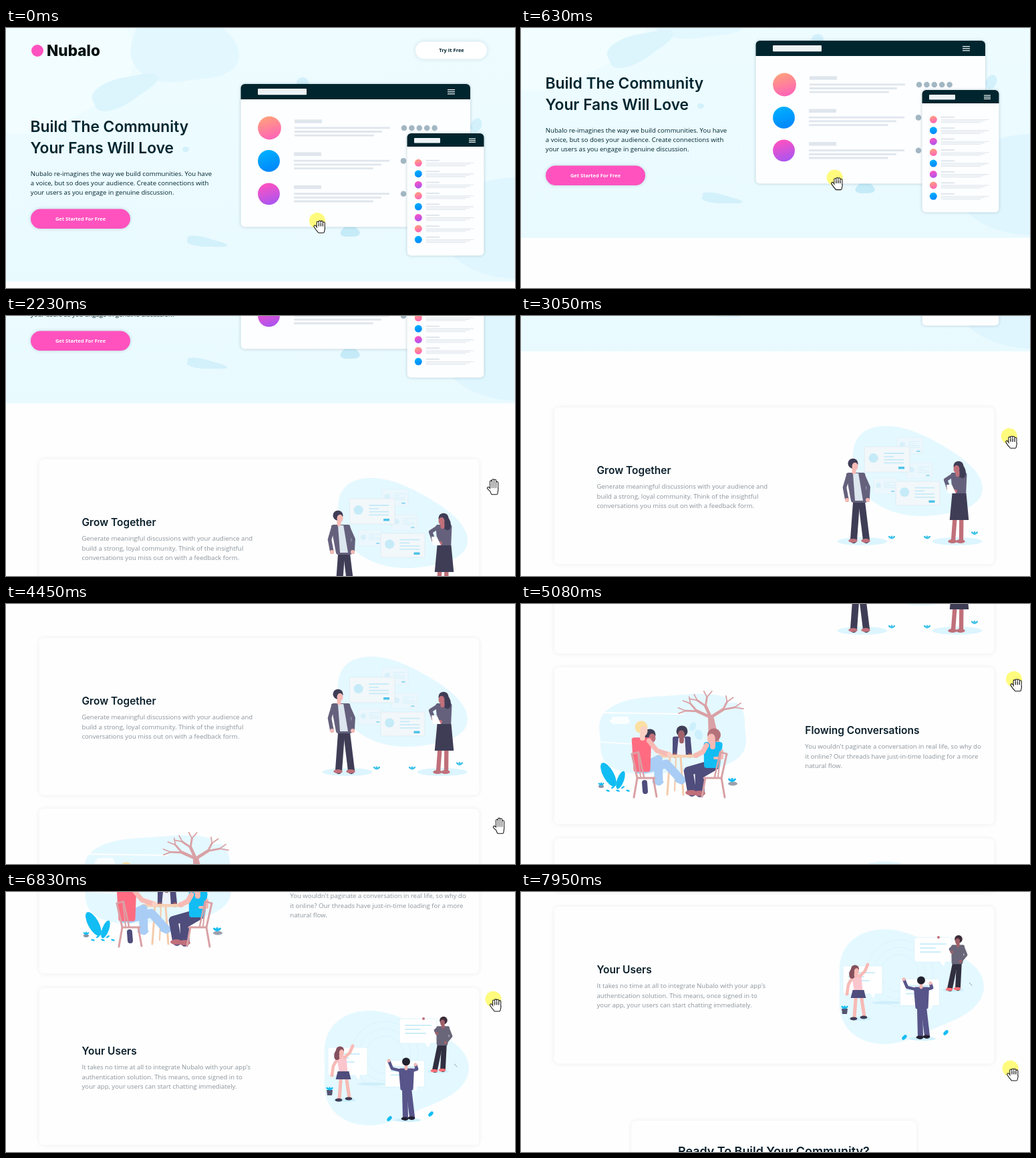
These frames come from a looping animation (762x390 px, 8000 ms). An HTML page with a canvas:

```html
<!DOCTYPE html>
<html lang="en">
<head>
<meta charset="utf-8">
<title>Community landing page</title>
<style>
html, body { margin: 0; width: 100%; height: 100%; overflow: hidden; background: #fefefe; }
canvas { display: block; width: 762px; height: 390px; }
</style>
</head>
<body>
<canvas id="stage"></canvas>
<script>
const W = 762, H = 390, PAGE = 1540, LOOP = 8000, TAU = Math.PI * 2;
const dpr = window.devicePixelRatio || 1;
const HEAD = 'Inter, sans-serif', BODY = '"Open Sans", sans-serif';
const INK = '#00252e', SKY = '#e4f8ff', SHADE = '#d3f1fb', BAR = '#dfe6ed', PALE = '#c6ebf8';
const NAVY = '#3f3d56', INDIGO = '#4f4d7c', SLATE = '#65617d', BLUE = '#12bdf3';
const ROSE = '#d9a1a5', BRICK = '#c0707a', PEACH = '#f7bab5', WOOD = '#f4cbac';

const stage = document.getElementById('stage');
const page = document.createElement('canvas');
let g;

function setup(canvas, h) {
  canvas.width = W * dpr;
  canvas.height = h * dpr;
  const c = canvas.getContext('2d');
  c.scale(dpr, dpr);
  return c;
}

// Basic shapes
function box(x, y, w, h, r, fill, edge) {
  g.beginPath();
  g.roundRect(x, y, w, h, r);
  g.fillStyle = fill;
  g.fill();
  if (edge) { g.strokeStyle = edge; g.lineWidth = 0.8; g.stroke(); }
}
function shadowed(blur, color, draw) {
  g.save();
  g.shadowBlur = blur * dpr;
  g.shadowColor = color;
  draw();
  g.restore();
}
function oval(x, y, rx, ry, fill, turn = 0) {
  g.beginPath();
  g.ellipse(x, y, rx, ry, turn, 0, TAU);
  g.fillStyle = fill;
  g.fill();
}
const dot = (x, y, r, fill) => oval(x, y, r, r, fill);
function line(color, w, ...p) {
  g.beginPath();
  for (let i = 0; i < p.length; i += 2) g.lineTo(p[i], p[i + 1]);
  g.strokeStyle = color;
  g.lineWidth = w;
  g.lineCap = g.lineJoin = 'round';
  g.stroke();
}
// Ellipse whose radius swells `lobes` times around
function blob(fill, x, y, rx, ry, turn, lobes, swell, phase = 0) {
  g.save();
  g.translate(x, y);
  g.rotate(turn);
  g.beginPath();
  for (let a = 0; a < TAU; a += 0.05) {
    const r = 1 + swell * Math.cos(lobes * (a - phase));
    g.lineTo(rx * r * Math.cos(a), ry * r * Math.sin(a));
  }
  g.fillStyle = fill;
  g.fill();
  g.restore();
}
// Four-sided shape between two level edges
function taper(fill, x1, y1, half1, x2, y2, half2, round = 0) {
  g.beginPath();
  g.moveTo(x1 - half1, y1);
  g.lineTo(x1 + half1, y1);
  g.lineTo(x2 + half2, y2);
  g.lineTo(x2 - half2, y2);
  g.closePath();
  g.fillStyle = g.strokeStyle = fill;
  g.fill();
  if (round) { g.lineWidth = round; g.lineJoin = 'round'; g.stroke(); }
}
function text(str, x, y, font, color, align = 'left') {
  g.font = font;
  g.fillStyle = color;
  g.textAlign = align;
  g.fillText(str, x, y);
}
function para(lines, x, y, color) {
  lines.forEach((s, i) => text(s, x, y + i * 14.4, '9.6px ' + BODY, color));
}
function fade(x0, y0, x1, y1, a, b) {
  const f = g.createLinearGradient(x0, y0, x1, y1);
  f.addColorStop(0, a);
  f.addColorStop(1, b);
  return f;
}

// Top of the page
function hero() {
  g.save();
  g.beginPath();
  g.rect(0, 0, W, 380);
  g.clip();
  box(0, 0, W, 380, 0, fade(0, 0, 0, 380, '#eefcff', '#e9faff'));
  blob('#f2fdff', 50, 40, 130, 115, 0, 3, 0.1);
  blob('#e3f7fe', 262, 22, 80, 62, 0.3, 3, 0.12);
  blob('#dcf5fd', 174, 95, 52, 20, -0.4, 3, 0.12);
  oval(269, 182, 5, 4, SHADE);
  blob(SHADE, 297, 321, 30, 7, 0.15, 3, 0.15);
  blob(PALE, 515, 305, 14, 9, 0, 3, 0.12, 0.5);
  oval(444, 82, 9, 8, SHADE);
  oval(704, 146, 8, 11, SHADE, 0.4);
  oval(765, 300, 115, 76, '#e0f6fe');
  g.restore();

  dot(47, 34, 9, '#ff52bf');
  text('Nubalo', 61, 41.5, '800 22.6px ' + HEAD, '#00100f');
  shadowed(6, 'rgba(0,50,70,.14)', () => box(613, 20.5, 107, 26, 13, '#fff'));
  text('Try It Free', 667, 35.5, 'bold 7.5px ' + BODY, INK, 'center');

  ['Build The Community', 'Your Fans Will Love'].forEach((s, i) =>
    text(s, 36.5, 156 + i * 32, '600 22.8px ' + HEAD, INK));
  para(['Nubalo re-imagines the way we build communities. You have',
    'a voice, but so does your audience. Create connections with',
    'your users as you engage in genuine discussion.'], 36.8, 221.5, INK);
  shadowed(5, 'rgba(0,50,70,.2)', () => box(37, 271.5, 149, 29.5, 14.75, '#ff52bf'));
  text('Get Started For Free', 111.5, 288.7, 'bold 7.5px ' + BODY, '#fff', 'center');
}
function avatar(x, y, r, i) {
  const [a, b] = [['#ffa07c', '#ff62ba'], ['#00b0ff', '#0086fb'], ['#ff52bf', '#a855f2']][i % 3];
  dot(x, y, r, fade(x - r * 0.3, y - r, x + r * 0.3, y + r, a, b));
}
function menu(x, y, w, gap) {
  for (let i = -1; i < 2; i++) box(x, y + i * gap - 0.6, w, 1.3, 0, '#e8f0f2');
}
function bars(x, y, w, h, gap) {
  for (let i = 0; i < 3; i++) box(x, y + i * gap, w * (1 - i * 0.085), h, 0.4, BAR);
}
function panel(x, y, w, h, top) {
  shadowed(4, 'rgba(0,60,80,.25)', () => box(x, y, w, h, 6, '#fdfeff'));
  box(x, y, w, top, [6, 6, 0, 0], INK);
}
function mockups() {
  panel(351.5, 84, 343.5, 214.5, 23);
  box(377, 91, 73, 9.2, 1, '#edf3f5');
  menu(661, 95.7, 11, 3.1);
  for (let i = 0; i < 3; i++) {
    const y = 150 + i * 49.4, x = i ? 431 : 432;
    avatar(i ? 393.5 : 394.5, y, i ? 16.4 : 17.4, i);
    box(x, y - 12.8, 41, 5.5, 0.5, BAR);
    bars(x, y - 1.6, 143, 2.8, 5.7);
    for (let k = 0; k < 5; k++) dot(x + 164 + k * 11.4, y, 4.3, '#a2b7c3');
  }
  panel(600.5, 158, 115, 183.5, 20);
  box(611, 165, 39, 7.5, 1, '#edf3f5');
  menu(693, 168.7, 10, 2.6);
  for (let i = 0; i < 8; i++) {
    const y = 202.3 + i * 16.43;
    avatar(617.3, y, 5.5, i);
    box(628.5, y - 4.6, 20.5, 2, 0, BAR);
    bars(628.5, y - 0.4, 72, 1.1, 2.1);
  }
}

function card(y, x, title, lines) {
  shadowed(6, 'rgba(30,60,80,.09)', () => box(49.5, y, 659, 235.5, 7, '#fefefe'));
  text(title, x, y + 99.5, '600 15.5px ' + HEAD, '#0a1f2b');
  para(lines, x, y + 122.3, '#8b949b');
}

// Parts shared by the illustrations
function leaves(x, y, size, color) {
  for (let i = -1; i < 2; i++) oval(x + i * size, y, size / 2, size, color, i * 0.9);
}
function limb(color, w, x1, y1, x2, y2, bend = 0) {
  const mx = (x1 + x2) / 2 - (y2 - y1) * bend, my = (y1 + y2) / 2 + (x2 - x1) * bend;
  line(color, w, x1, y1, mx, my, x2, y2);
}
function head(x, y, r, { skin, hair, face = 1, long }) {
  if (long) oval(x - face * r * 0.5, y + r * 0.7, r * 0.9, r * 1.5, hair, face * 0.3);
  line(skin, r * 0.8, x + face * r * 0.2, y, x + face * r * 0.2, y + r * 1.5);
  dot(x, y - r * 0.25, r, hair);
  if (face) oval(x + face * r * 0.4, y + r * 0.35, r * 0.6, r * 0.8, skin);
}
// Hands and feet are [x, y, bend of the elbow or knee]
function person(p) {
  const [x, y] = p.head, [hx, hy] = p.hip, r = p.r, wide = p.wide || 1.3;
  const sx = x + (hx - x) * 0.45, sy = y + (hy - y) * 0.28;
  (p.feet || []).forEach(([fx, fy, bend], i) => {
    limb(p.legs, r * (p.skirt ? 0.85 : 1.35), hx + (i - 0.5) * r, hy, fx, fy, bend);
    oval(fx - 1, fy + 1, r * 0.9, r * 0.4, p.shoe);
  });
  taper(p.top, sx, sy, wide * r, hx, hy, wide * r * 0.8, r * 0.8);
  if (p.skirt) taper(p.cloth, hx, hy, r * 1.4, hx, hy + p.skirt, r * 1.9);
  if (p.shirt) taper(p.shirt, sx, sy - 2, r * 0.55, hx, hy, r * 0.8);
  (p.hands || []).forEach(([ax, ay, bend]) => {
    const side = Math.sign(ax - sx) * wide * r;
    limb(p.sleeve || p.top, r * 0.75, sx + side, sy + 1, ax, ay, bend);
    dot(ax, ay, r * 0.4, p.skin);
  });
  head(x, y, r, p);
}

function note(x, y, w, h, s) {
  box(x, y, w, h, 1, '#f2f7fa', '#dbeaf1');
  dot(x + w * 0.2, y + h * 0.45, 7 * s, PALE);
  for (let i = 0; i < 4; i++) box(x + w * 0.43, y + h * 0.24 + i * 4.8 * s, (i === 1 ? 15 : 30) * s, 1.8 * s, 0.8, PALE);
  box(x + w * 0.75, y + h * 0.79, 9 * s, 3.6 * s, 0.5, '#4cc3e8');
}
function growScene() {
  blob(SKY, 587, 150, 101, 61, 0.35, 3, 0.07, -0.23);
  for (const x of [511, 653]) oval(x, 252, 37.5, 6, '#dcf5fe');
  g.globalAlpha = 0.55;
  note(563, 96, 39, 25, 0.6);
  note(577, 134, 39, 23, 0.6);
  note(528, 157, 35, 24, 0.55);
  g.globalAlpha = 1;
  note(514, 110, 68, 38, 1);
  note(561, 162, 66, 36, 1);
  for (const x of [555, 608, 679]) leaves(x, x > 650 ? 239.5 : 246, 2.8, '#3fc3ea');

  person({ head: [497, 137], r: 7.5, hip: [506, 191], wide: 1.5, feet: [[498, 250], [517, 250]],
    hands: [[488, 190, 0.12], [519, 190, -0.12]],
    skin: PEACH, hair: NAVY, top: SLATE, shirt: '#dce6ee', legs: NAVY, shoe: BRICK });
  person({ head: [655, 141], r: 7.5, hip: [656, 180], wide: 1.2, feet: [[647, 251], [659, 251]], skirt: 40,
    hands: [[640, 172, 0.4], [650, 177, -0.5]], face: -1, long: true,
    skin: BRICK, hair: NAVY, top: SLATE, cloth: NAVY, legs: BRICK, shoe: BRICK });
  taper('#fff', 641, 167, 4, 645, 180, 6);
}

// Branches fork until they are thin
function branch(x, y, angle, len, w) {
  const ex = x + Math.cos(angle) * len, ey = y + Math.sin(angle) * len * 0.75;
  line(ROSE, w, x, y, ex, ey);
  if (w < 2) return;
  branch(ex, ey, angle - 0.5, len * 0.7, w * 0.62);
  branch(ex, ey, angle + 0.45, len * 0.75, w * 0.62);
}
function chair(x, y, d) {
  line(ROSE, 3, x, y, x + 8 * d, y + 36, x + 34 * d, y + 36);
  line(ROSE, 2.5, x, y, x + 10 * d, y - 3, x + 18 * d, y + 34);
  line(ROSE, 2, x + 9 * d, y - 2, x + 13 * d, y + 34);
  line(ROSE, 3, x + 8 * d, y + 36, x + 3 * d, y + 65);
  line(ROSE, 3, x + 32 * d, y + 36, x + 37 * d, y + 64);
}
function talkScene() {
  blob(SKY, 227, 151, 117, 62, -0.07, 4, 0.07, TAU / 8);
  line('#fff', 2.2, 118, 119, 242, 121);
  line('#fff', 1.6, 118, 163, 166, 166);
  box(136, 125, 25, 11, 2, '#fbfeff');
  box(133, 129, 30, 5, 2, '#fbfeff');
  box(306, 98, 20, 6, 2, '#fbfeff');
  taper(ROSE, 284, 124, 4, 290, 170, 9);
  for (const a of [-2.6, -1.9, -0.7]) branch(284, 126, a, 24, 4.6);
  oval(257, 140, 5, 7, '#cdf0fc', 0.4);
  oval(266, 152, 6, 8, '#cdf0fc', -0.4);

  head(193, 154, 8.5, { skin: BRICK, hair: NAVY, long: true });
  person({ head: [241, 149], r: 8.5, hip: [240, 182], wide: 1.2, hands: [[230, 183], [253, 183]], face: -0.3,
    skin: '#a0616a', hair: NAVY, top: INDIGO, shirt: '#eef2fb' });

  for (const s of [-1, 1]) line(WOOD, 3, 231 + s * 8, 186, 231 + s * 12, 242);
  line(WOOD, 2.2, 232, 186, 230, 236);
  box(203, 182, 60, 4.5, 2, '#f6cfb2');

  person({ head: [180, 143], r: 9.5, hip: [181, 204], wide: 1.15, feet: [[206, 222, -0.8], [240, 220, -0.3]],
    hands: [[222, 182, 0.15]], sleeve: PEACH,
    skin: '#fbd0c4', hair: '#fbe0a2', top: '#ff6c81', legs: '#a9cdf5', shoe: '#a9cdf5' });
  line(INDIGO, 8, 185, 224, 186, 237);
  chair(166, 181, 1);
  person({ head: [289, 155], r: 10, hip: [286, 198], wide: 1, feet: [[256, 238, 0.45], [268, 239, 0.3]],
    hands: [[262, 183, -0.15]], face: -1, sleeve: PEACH,
    skin: PEACH, hair: '#b5727b', top: BLUE, legs: INDIGO, shoe: BRICK });
  limb(PEACH, 4, 301, 176, 290, 187, -0.5);
  chair(308, 181, -1);

  oval(131, 212, 8, 20, BLUE, -0.5);
  oval(149, 220, 5, 14, BLUE, 0.35);
  for (let i = 0; i < 5; i++) oval(130 + i * 7.5, 236 - (i % 2) * 5, 3, 1.3, BLUE, i % 2 ? -0.6 : 0.3);
  oval(120, 229.5, 4, 2.5, '#8b93a5');
  oval(317, 225.5, 7, 3, '#9aa0ae');
  leaves(120, 226, 2.4, BLUE);
  leaves(316, 220, 3.2, BLUE);
}

function sign(x, y, w, h) {
  box(x, y, w, h, 2, '#fff', '#d8f1fa');
  taper('#fff', x + w * 0.75, y + h - 1, 4, x + w * 0.78, y + h + 6, 0.5);
  for (let i = 0; i < 3; i++) box(x + 8, y + 9 + i * 6, i === 1 ? 24 : 40 - i * 4, 2, 1, '#cdeefa');
}
function usersScene() {
  blob(SKY, 572, 142, 108, 82, 0, 3, 0.12);
  g.strokeStyle = '#d9f4fd';
  g.lineWidth = 1;
  for (let r = 28; r < 55; r += 11) { g.beginPath(); g.arc(567, 122, r, 0, TAU); g.stroke(); }
  oval(548, 166, 22, 2.5, '#cfeffa');
  oval(507, 190, 17, 3, '#cdf0fb');
  oval(647, 147, 16, 3, '#cdf0fb');
  oval(601, 220, 20, 3, '#cdf0fb');
  sign(482, 111, 59, 42);
  sign(567.5, 130.5, 59, 40);
  sign(589, 68, 56, 37);
  dot(625, 68, 2, BRICK);

  person({ head: [500, 117], r: 6, hip: [505, 147], wide: 0.8, feet: [[499, 189], [514, 187]], skirt: 12,
    hands: [[519, 109, 0.1], [488, 153, 0.1]], long: true, sleeve: PEACH,
    skin: PEACH, hair: '#85505d', top: '#fac5cd', cloth: INDIGO, legs: PEACH, shoe: NAVY });
  person({ head: [599, 134], r: 6, hip: [600, 173], wide: 1.5, feet: [[598, 217], [608, 216]],
    hands: [[573, 131, -0.25], [613, 137, 0.5]], face: 0,
    skin: PEACH, hair: '#22222f', top: '#57558a', legs: '#57558a', shoe: '#22222f' });
  person({ head: [655, 72], r: 5.8, hip: [653, 106], wide: 1.3, feet: [[642, 145], [654, 144]],
    hands: [[645, 90, 0.4], [658, 104, -0.3]], face: -0.6,
    skin: '#a0616a', hair: '#3c2c38', top: '#6a6679', legs: '#302f40', shoe: '#ff6f76' });

  taper('#55536f', 484.5, 175, 4.5, 484.5, 183, 3.5);
  leaves(484.5, 173, 2.8, BLUE);
  oval(574, 218, 4.5, 2.6, BLUE, -0.8);
  oval(636, 211, 4.5, 2.6, BLUE, -0.8);
  line('#75879a', 0.8, 671, 136, 675, 140);
}

function shifted(y, draw) {
  g.save();
  g.translate(0, y);
  draw();
  g.restore();
}
function paintPage() {
  g = setup(page, PAGE);
  box(0, 0, W, PAGE, 0, '#fefefe');
  hero();
  mockups();
  card(464, 113.5, 'Grow Together', ['Generate meaningful discussions with your audience and',
    'build a strong, loyal community. Think of the insightful',
    'conversations you miss out on with a feedback form.']);
  shifted(413, growScene);
  card(720, 425.3, 'Flowing Conversations', ["You wouldn't paginate a conversation in real life, so why do",
    'it online? Our threads have just-in-time loading for a more',
    'natural flow.']);
  shifted(669, talkScene);
  card(977, 113.5, 'Your Users', ["It takes no time at all to integrate Nubalo with your app's",
    'authentication solution. This means, once signed in to',
    'your app, your users can start chatting immediately.']);
  shifted(955, usersScene);
  shadowed(6, 'rgba(30,60,80,.09)', () => box(165, 1298, 427, 150, 7, '#fefefe'));
  text('Ready To Build Your Community?', 378.3, 1350, '600 17.9px ' + HEAD, '#0a1f2b', 'center');
}

// Pointer: an open hand, or a closed one on a yellow spot
function hand(x, y, held) {
  const low = held ? 17 : 19, knuckle = held ? 9 : 11;
  const shape = (color, w) => {
    for (let i = 0; i < 4; i++) {
      const top = (held ? 2 : -1) + (i - 1.3) ** 2 * (held ? 0.7 : 1.3);
      line(color, w, 1.3 + i * 3, top, 1.5 + i * 2.9, 12);
    }
    line(color, w, -2.8, knuckle, 0.5, 14);
    line(color, w, 0.5, 13, 3, low, 9.5, low, 10.5, 12);
  };
  g.save();
  g.translate(x, y);
  if (held) dot(0, 0, 12, 'rgba(255,250,75,.72)');
  g.translate(held ? -0.6 : 0.8, held ? -0.4 : -1.4);
  shape('#111', 4.2);
  shape('#fff', 2.1);
  taper('#fff', 5.6, knuckle, 5.2, 6.2, low, 3.4);
  if (held) for (let i = 0; i < 3; i++) line('#111', 0.7, 2.9 + i * 3, 5, 2.9 + i * 3, 8.5);
  g.restore();
}

// Moves [start, end, x, y] alternate: drag the page up, return with an open hand
const MOVES = [
  [70, 1750, 480, 40], [1750, 2230, 735, 258],
  [2620, 3510, 726, 94], [3510, 4280, 733, 325],
  [4490, 5290, 739, 69], [5290, 6290, 738, 325],
  [6330, 7055, 727, 112], [7055, 7700, 735, 338],
  [7700, 8400, 727, 87]
];
function pose(t) {
  let x = 466, y = 289, scroll = 0, held = t < 70;
  MOVES.forEach(([start, end, toX, toY], i) => {
    if (t < start) return;
    const u = Math.min(1, (t - start) / (end - start)), e = u * u * (3 - 2 * u);
    const dy = (toY - y) * e, drag = i % 2 === 0;
    x += (toX - x) * e;
    y += dy;
    if (drag) scroll -= dy;
    held = drag && u < 1;
  });
  return { x, y, scroll: Math.round(scroll), held };
}
function step(t) {
  const base = t < 2560 ? 0 : t < 4450 ? 2560 : 4450;
  return base + Math.floor((t - base) / 70) * 70;
}

paintPage();
const view = setup(stage, H);
const start = performance.now();
function tick() {
  const p = pose(step((performance.now() - start) % LOOP));
  g = view;
  g.drawImage(page, 0, p.scroll * dpr, W * dpr, H * dpr, 0, 0, W, H);
  hand(p.x, p.y, p.held);
  requestAnimationFrame(tick);
}
tick();
</script>
</body>
</html>
```
